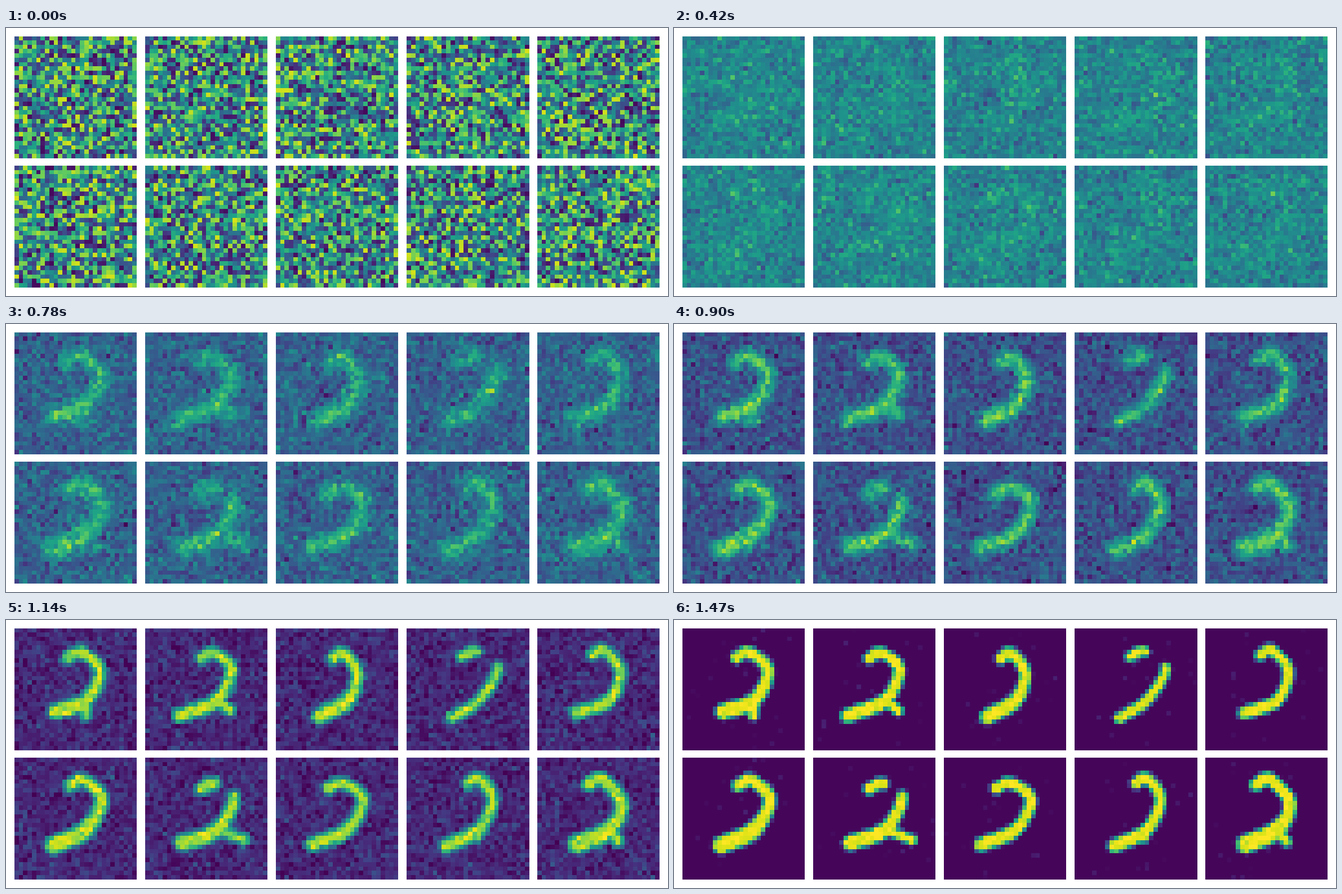
A matplotlib script that plays this animation: 1175 px wide and 477 px high, repeating every 1.5 s.

```python
import numpy as np
import matplotlib.pyplot as plt
from matplotlib.animation import FuncAnimation

W, H, DPI = 1175, 477, 64
SIDE, CELLS = 217, 28
MARGIN, STEP_X, STEP_Y = 15, 232, 230
FRAMES, INTERVAL = 50, 30
KEEP = 0.88  # share of the noise carried over to the next frame
HEEL = np.array([16.5, 16.5])  # where the stem of every digit meets its base


def smooth(t):
    t = np.clip(t, 0, 1)
    return t * t * (3 - 2 * t)


def spline(points, per=16):
    """Catmull-Rom curve, one row of samples for each segment."""
    p = np.array(points, float)
    p = np.vstack([2 * p[0] - p[1], p, 2 * p[-1] - p[-2]])
    t = np.linspace(0, 1, per)[:, None]
    return np.array([0.5 * (2 * b + (c - a) * t
                            + (2 * a - 5 * b + 4 * c - d) * t ** 2
                            + (3 * b - a - 3 * c + d) * t ** 3)
                     for a, b, c, d in zip(p, p[1:], p[2:], p[3:])])


def inside(curve, radius):
    """Depth of each cell inside a brush stroke, negative outside."""
    mid = np.arange(CELLS) + 0.5
    dx = mid[None, :, None] - curve[:, 0]
    dy = mid[:, None, None] - curve[:, 1]
    return (radius - np.hypot(dx, dy)).max(axis=2)


def two(hook, side, foot, weight, tail=None, gap=False):
    """A handwritten 2: hook, crest, right side, heel, foot, optional tail."""
    crest = hook[0] + 0.4 * (side[0] - hook[0]), hook[1] - 1.2
    curve = spline([hook, crest, side, HEEL, foot])
    thin = 0.7 + 0.35 * weight
    t = np.linspace(0, 1, curve.shape[0] * curve.shape[1])
    radius = thin + (weight - thin) * smooth((t - 0.55) / 0.3)
    radius = radius.reshape(curve.shape[:2])
    if gap:
        curve, radius = np.delete(curve, 1, 0), np.delete(radius, 1, 0)
    depth = inside(curve.reshape(-1, 2), radius.ravel())
    if tail:
        depth = np.maximum(depth, inside(spline([HEEL, tail])[0], 1.1))
    return depth


depth = np.array([
    two((12.4, 6.8), (19.6, 9.8), (9.4, 19.2), 1.75, tail=(16.2, 20)),
    two((12.9, 6.9), (19.7, 9.5), (8, 20.1), 1.6, tail=(19.5, 18.9)),
    two((13.2, 7), (18.6, 10.3), (10, 20.3), 1.7),
    two((12.7, 6.6), (20.8, 9.2), (10.2, 20.7), 1.2, gap=True),
    two((12.6, 6.3), (19, 9.8), (9, 19.5), 1.4),
    two((12.8, 6.4), (20, 9.5), (9, 20.1), 1.95),
    two((12.9, 7.2), (20.4, 9), (8.6, 19.6), 1.7, tail=(22.7, 18.9), gap=True),
    two((12.1, 7), (19.9, 9.6), (8.6, 20), 1.55),
    two((14.1, 5.9), (19.6, 9.5), (9.2, 20.3), 1.5, tail=(15.8, 18.4)),
    two((11.7, 6.2), (19.4, 10.5), (9.3, 19.9), 2.05, tail=(18.6, 19.3)),
])

rng = np.random.default_rng(12)
noise = [(rng.random(depth.shape) - 0.5) * np.sqrt(12)]
for _ in range(FRAMES - 1):
    fresh = rng.standard_normal(depth.shape)
    noise.append(KEEP * noise[-1] + np.sqrt(1 - KEEP ** 2) * fresh)


def picture(i):
    u = i / (FRAMES - 1)
    clear = np.sin(np.pi / 2 * u ** 1.4) ** 2
    paper = 0.48 - 0.462 * clear
    ink = 0.48 + 0.49 * clear ** 0.8
    soft = 7 - 5.85 * np.sqrt(clear)
    cover = np.clip(depth / soft + 0.55, 0, 1)
    sigma = (0.085 * np.sqrt(max(0, 1 - clear ** 3))
             + 0.18 * np.exp(-(i / 3.5) ** 1.6))
    n = noise[i]
    grain = n * np.maximum(sigma, 0.025 * cover)
    specks = smooth(5 * u - 4) * 0.07 * np.clip(n - 1.9, 0, 1) * (depth > -7)
    return paper + (ink - paper) * cover + grain + specks


fig = plt.figure(figsize=(W / DPI, H / DPI), dpi=DPI, facecolor="white")
tiles = []
for k in range(len(depth)):
    x = MARGIN + STEP_X * (k % 5)
    y = H - MARGIN - STEP_Y * (k // 5) - SIDE
    ax = fig.add_axes([x / W, y / H, SIDE / W, SIDE / H])
    ax.axis("off")
    tiles.append(ax.imshow(np.zeros((CELLS, CELLS)), cmap="viridis", vmin=0,
                           vmax=1, interpolation="nearest", aspect="auto"))


def update(i):
    for tile, values in zip(tiles, picture(i)):
        tile.set_data(values)
    return tiles


anim = FuncAnimation(fig, update, frames=FRAMES, interval=INTERVAL,
                     repeat=True, repeat_delay=0, blit=False)
plt.show()
```
